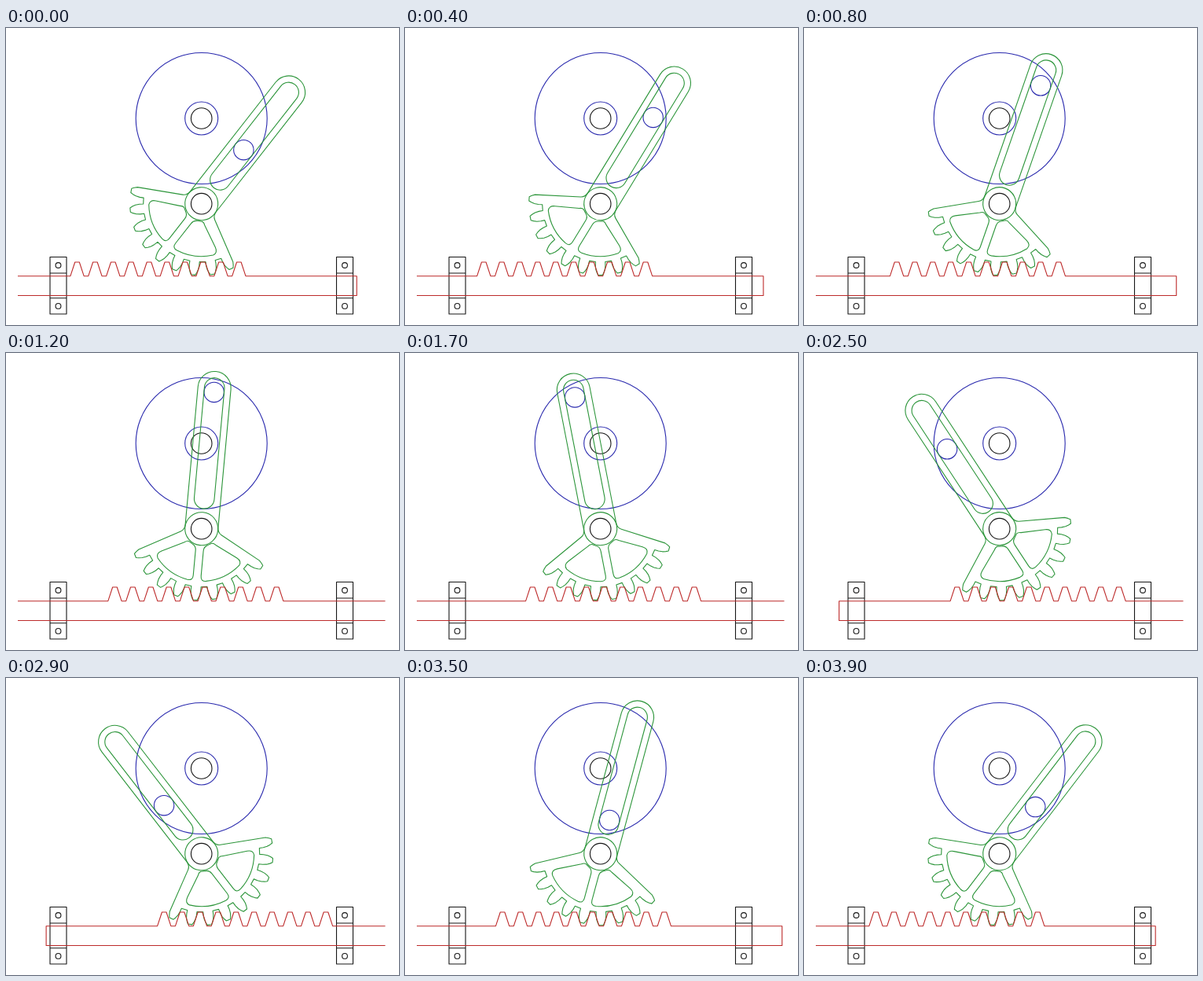
Write an HTML page that moves like this. It is 500x378 px and loops after 4000 ms.

```html
<!DOCTYPE html>
<html lang="en">
<head>
<meta charset="utf-8">
<title>Rack and slotted lever</title>
<style>
  html, body { margin: 0; width: 100%; height: 100%; overflow: hidden; background: #fff; }
  svg { display: block; width: 500px; height: 378px; }
  .line { fill: none; stroke-width: 1.1; stroke-linejoin: round; }
  .black { stroke: #161616; }
  .blue { stroke: #2a2aae; }
  .green { stroke: #2c953a; }
  .red { stroke: #bd2a2a; }
</style>
</head>
<body>
<svg viewBox="0 0 500 378">
  <defs><clipPath id="view"><rect x="15" y="280" width="467.5" height="90"/></clipPath></defs>
  <g id="blocks" class="line black"></g>
  <g class="line blue">
    <circle cx="248.7" cy="115" r="83.5"/>
    <circle cx="248.7" cy="115" r="21"/>
    <circle id="pin" r="12.7"/>
  </g>
  <g class="line black">
    <circle cx="248.7" cy="115" r="13.3"/>
    <circle cx="248.7" cy="223.7" r="13.3"/>
  </g>
  <g id="lever" class="line green"></g>
  <g clip-path="url(#view)"><path id="rack" class="line red"/></g>
</svg>
<script>
const CX = 248.7, CRANK_Y = 115, PIVOT_Y = 223.7;
const CRANK_R = 67, PITCH_R = 83.7, TOOTH_STEP = 360 / 23;
const LOOP = 4000, TICK = 100;
const RAD = Math.PI / 180;
const el = id => document.getElementById(id);

// Crank angle in degrees at a given tick
const crankKeys = [
  [0, 36.8], [4, -0.9], [6, -19.7], [12, -76.2], [18, -127.6], [22, -166.2],
  [24, -176.6], [29, -224.7], [35, -279.9], [36, -292], [39, -312.9], [40, -323.2]
];

function crankAngle(tick) {
  const i = crankKeys.findIndex(key => key[0] > tick);
  const [t0, a0] = crankKeys[i - 1], [t1, a1] = crankKeys[i];
  return a0 + (a1 - a0) * (tick - t0) / (t1 - t0);
}

// Half a gear tooth: radius, half-angle
const flank = [[74, 4.8], [79, 4.6], [84, 3.9], [88, 2.8], [91, 1.7]];

function sectorTeeth() {
  const points = [];
  for (let k = 4; k >= -4; k--) {
    let tooth = [...flank, ...flank.map(([r, a]) => [r, -a]).reverse()];
    if (k === 4) tooth = tooth.slice(2);
    if (k === -4) tooth = tooth.slice(0, -2);
    for (const [r, a] of tooth) {
      const phi = (k * TOOTH_STEP + a) * RAD;
      points.push(`${(r * Math.sin(phi)).toFixed(2)},${(r * Math.cos(phi)).toFixed(2)}`);
    }
  }
  return points.join(' ');
}

function buildLever() {
  const outline = `M-21,-180 A21,21 0 0 1 21,-180 L21,-4 Q21,3 26,5.7
    L${sectorTeeth()} L-26,5.7 Q-21,3 -21,-4 Z`;
  const slot = 'M-12.8,-180 a12.8,12.8 0 0 1 25.6,0 V-38.5 a12.8,12.8 0 0 1 -25.6,0 Z';
  const hole = `M5,28 Q5,22.5 9.4,20.4 L14.5,17.3 Q17,16.6 20,19 L48,32.8
    Q55,36.3 52,42.2 A67,67 0 0 1 12,65.9 Q5,67 5,60 Z`;
  el('lever').innerHTML = `<circle r="21"/><path d="${outline}"/><path d="${slot}"/>
    <path d="${hole}"/><path d="${hole}" transform="scale(-1 1)"/>`;
}

function buildRack() {
  const pitch = PITCH_R * TOOTH_STEP * RAD;
  let d = 'M-59.5,315.7';
  for (let i = 0; i < 10; i++) {
    const x = 82 + i * pitch;
    d += ` L${x},315.7 L${x + 5.8},298 L${x + 11.4},298 L${x + 17.2},315.7`;
  }
  el('rack').setAttribute('d', d + ' H446.3 V340.5 H-59.5 Z');
}

function buildBlocks() {
  el('blocks').innerHTML = [66.5, 431].map(x => `
    <rect x="${x - 10.5}" y="291.5" width="21" height="72.5"/>
    <path d="M${x - 10.5},312 h21 M${x - 10.5},343.7 h21"/>
    <circle cx="${x}" cy="302" r="3.4"/><circle cx="${x}" cy="353.9" r="3.4"/>`).join('');
}

function draw(time) {
  const tick = Math.floor((time % LOOP) / TICK);
  const a = crankAngle(tick) * RAD;
  const x = CX + CRANK_R * Math.cos(a), y = CRANK_Y + CRANK_R * Math.sin(a);
  const tilt = Math.atan2(x - CX, PIVOT_Y - y);
  el('pin').setAttribute('cx', x);
  el('pin').setAttribute('cy', y);
  el('lever').setAttribute('transform', `translate(${CX} ${PIVOT_Y}) rotate(${tilt / RAD})`);
  el('rack').setAttribute('transform', `translate(${PITCH_R * (38 * RAD - tilt)} 0)`);
}

buildLever();
buildRack();
buildBlocks();

const start = performance.now();
function loop() {
  draw(performance.now() - start);
  requestAnimationFrame(loop);
}
loop();
</script>
</body>
</html>
```
